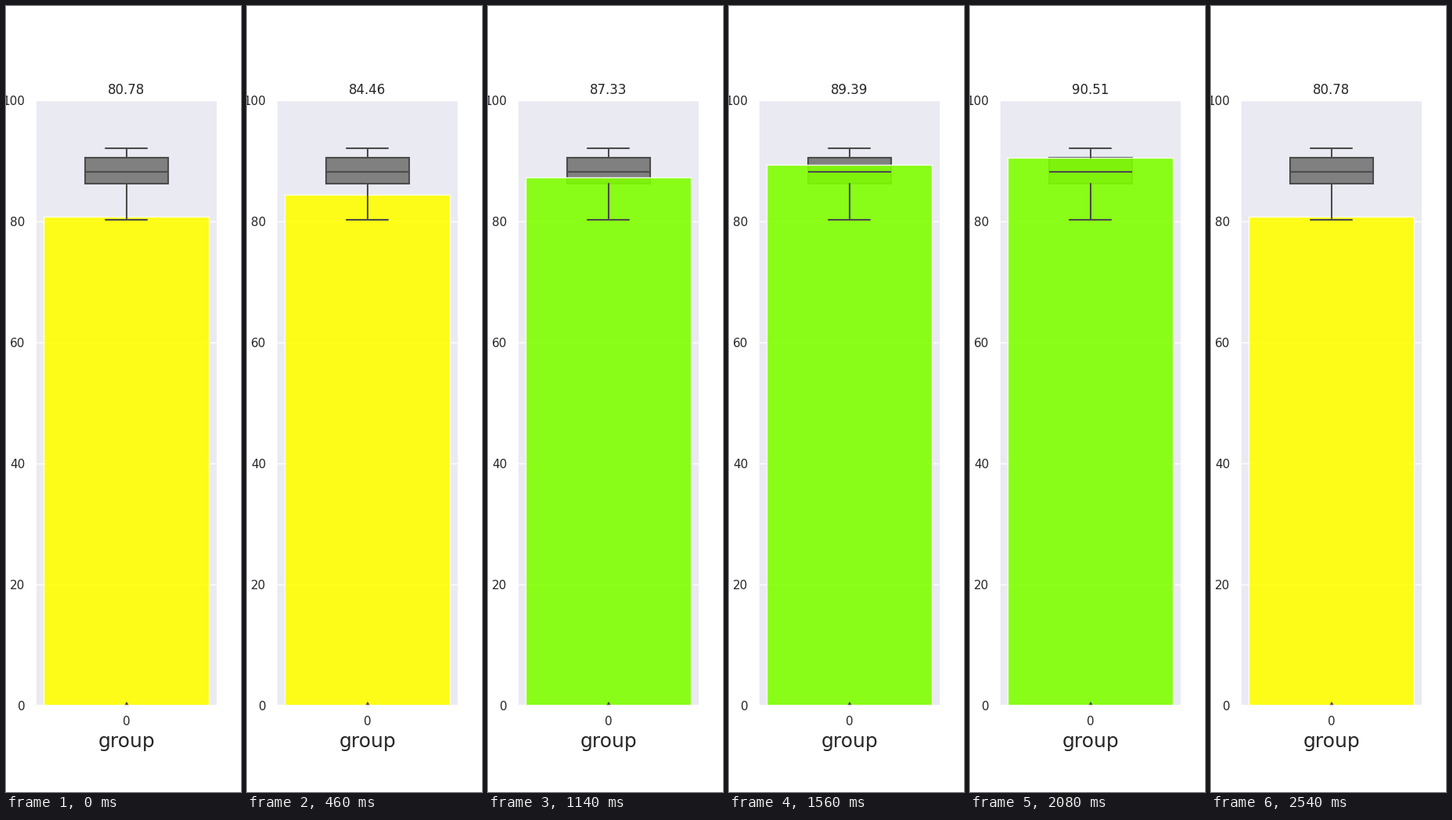
A matplotlib script for the animation above (2560 ms loop, 300 by 1000 pixels).

```python
import numpy as np
import matplotlib.pyplot as plt
from matplotlib.animation import FuncAnimation

STEP_MS = 20
LOOP_MS = 2560
INK = "#262626"
LINE = "#4c4c4c"
THRESHOLD = 85

plt.rcParams.update({
    "font.family": "DejaVu Sans",
    "lines.solid_capstyle": "round",
    "text.color": INK,
    "axes.labelcolor": INK,
    "xtick.color": INK,
    "ytick.color": INK,
})

# Turning points of the measured value: (time in ms, value)
TURNS = np.array([
    (0, 80.78), (160, 88.6), (280, 90.2), (460, 84.46), (560, 84.9),
    (840, 92.09), (940, 92.09), (1140, 87.33), (1300, 80.26), (1440, 88.4),
    (1620, 90.8), (1720, 90.0), (1880, 83.01), (2060, 90.6),
    (2240, 87.77), (2360, 89.6), (2540, 80.78),
])

# Bursts of updates: (first ms, last ms, number of updates)
BURSTS = [
    (0, 0, 1), (20, 460, 12), (480, 520, 2), (620, 840, 8), (940, 1140, 7),
    (1160, 1620, 11), (1720, 1880, 5), (1900, 2240, 10), (2260, 2540, 7),
]
UPDATES = np.concatenate([
    np.round(np.linspace(a, b, n) / STEP_MS) * STEP_MS for a, b, n in BURSTS
])


def value_at(ms):
    """Value of the latest update, eased between the turning points."""
    t = UPDATES[np.searchsorted(UPDATES, ms, side="right") - 1]
    times, values = TURNS.T
    i = min(np.searchsorted(times, t, side="right") - 1, len(times) - 2)
    u = (t - times[i]) / (times[i + 1] - times[i])
    ease = (1 - np.cos(np.pi * u)) / 2
    return values[i] + (values[i + 1] - values[i]) * ease


fig, ax = plt.subplots(figsize=(3, 10), dpi=100, facecolor="white")
ax.set_facecolor("#eaeaf2")
ax.set_axisbelow(True)
ax.grid(axis="y", color="white", linewidth=1)
for spine in ax.spines.values():
    spine.set(edgecolor="white", linewidth=1.25)

line = dict(color=LINE, linewidth=1.5)
summary = dict(whislo=80.26, q1=86.24, med=88.2, q3=90.54, whishi=92.09,
               fliers=[0])
parts = ax.bxp(
    [summary], positions=[0], widths=0.4, patch_artist=True,
    manage_ticks=False, zorder=2,
    boxprops=dict(facecolor="#808080", edgecolor=LINE, linewidth=1.5),
    medianprops=line, whiskerprops=line, capprops=line,
    flierprops=dict(marker="d", markersize=5, markerfacecolor=LINE,
                    markeredgecolor=LINE, markeredgewidth=0),
)
parts["boxes"][0].set_zorder(0.9)

bar = ax.bar(0, 80.78, width=0.8, alpha=0.9, edgecolor="white",
             linewidth=1, zorder=1)[0]

ax.set(xlim=(-0.44, 0.44), ylim=(0, 100), xticks=[0],
       yticks=range(0, 101, 20))
ax.set_xticklabels(["0"])
ax.tick_params(length=6, pad=3.5, labelsize=11, bottom=False, left=False)
ax.set_xlabel("group", fontsize=18)
title = ax.set_title("", fontsize=12)


def draw(frame):
    value = value_at(frame * STEP_MS)
    bar.set_height(value)
    bar.set_facecolor("yellow" if value < THRESHOLD else "chartreuse")
    title.set_text(f"{value:.2f}")
    return bar, title


anim = FuncAnimation(fig, draw, frames=LOOP_MS // STEP_MS, interval=STEP_MS,
                     repeat=True, repeat_delay=0, blit=False)
plt.show()
```
